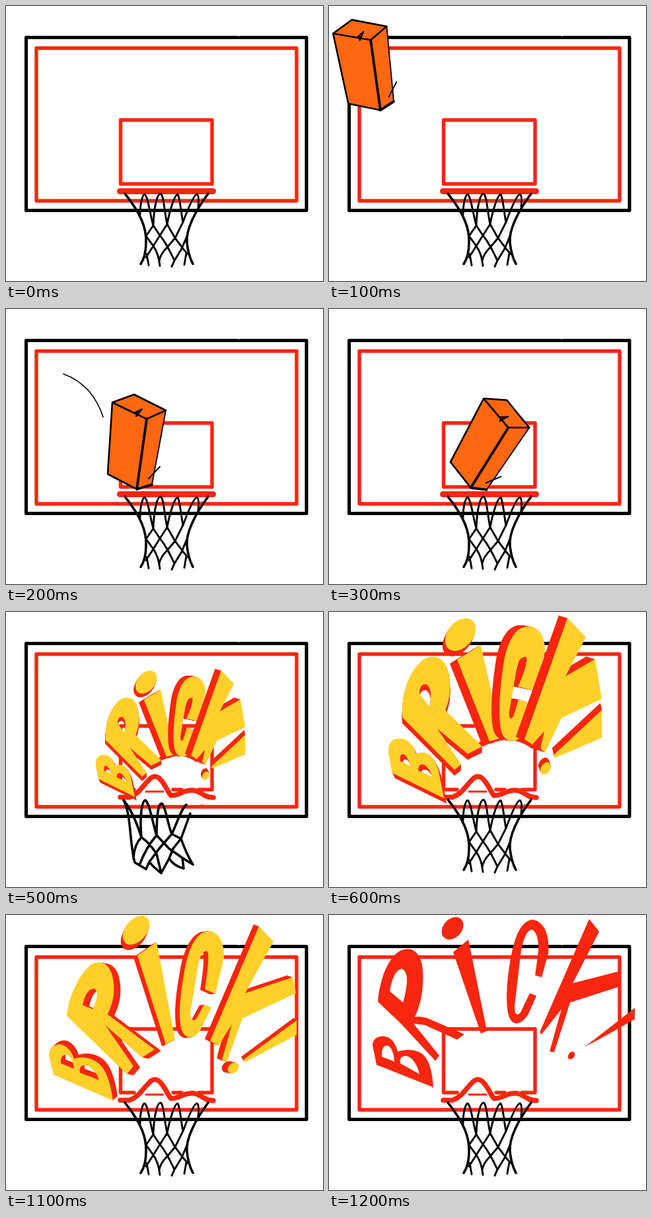
Recreate the animation shown at these times as an HTML page. Size 480 by 415 pixels, loop 1.3 s.

```html
<!DOCTYPE html>
<html lang="en">
<head>
<meta charset="utf-8">
<title>Brick</title>
<style>
html, body { margin: 0; width: 100%; height: 100%; overflow: hidden; background: #fff; }
svg { display: block; width: 100vw; height: 100vh; }
</style>
</head>
<body>
<svg id="stage" viewBox="0 0 480 415">
  <defs>
    <filter id="rough" x="0" y="0" width="480" height="415" filterUnits="userSpaceOnUse" color-interpolation-filters="sRGB">
      <feTurbulence type="fractalNoise" baseFrequency=".16" numOctaves="1" seed="4"/>
      <feDisplacementMap in="SourceGraphic" scale="1.6" xChannelSelector="R" yChannelSelector="G"/>
    </filter>
  </defs>
</svg>
<script>
const RED = '#f9260f', ORANGE = '#ff6710', YELLOW = '#ffd02a', BLACK = '#000';
const stage = document.getElementById('stage');

const fill = (d, color) => `<path d="${d}" fill="${color}" fill-rule="evenodd"/>`;
const line = (d, color, width) =>
  `<path d="${d}" fill="none" stroke="${color}" stroke-width="${width}" stroke-linecap="round" stroke-linejoin="round"/>`;
const group = (body, attrs = '') => `<g ${attrs}>${body}</g>`;
const rough = body => group(body, 'filter="url(#rough)"');

// Solid letter: face on top of copies swept along (dx, dy).
function solid([d, dx, dy]) {
  const steps = Math.ceil(Math.hypot(dx, dy));
  let out = '';
  for (let i = steps; i > 0; i--)
    out += group(fill(d, RED), `transform="translate(${dx * i / steps} ${dy * i / steps})"`);
  return out + fill(d, YELLOW);
}

const blob = (cx, cy, rx, ry, angle) => {
  const a = angle * Math.PI / 180, x = rx * Math.cos(a), y = rx * Math.sin(a);
  return `M${cx - x} ${cy - y}a${rx} ${ry} ${angle} 1 1 ${2 * x} ${2 * y}a${rx} ${ry} ${angle} 1 1 ${-2 * x} ${-2 * y}Z`;
};

const board = rough(
  line('M30.500 47.500H455V308.500H30.500Z', BLACK, 5) +
  line('M46 63.500H440V294H46Z', RED, 5.400));

const square = rough(line('M173.500 172H312V268.500H173.500Z', RED, 5.400));
const rim = rough(line('M172.500 279.500H313.500', RED, 9));

const brokenSquare = rough(
  line('M194 268H173.500V172H312V268H292M253 268H266', RED, 5.400) + line('M212 271H238', RED, 3));
const brokenRim = rough(line(
  'M173 279.500H187C202 274 208 261 215 255Q225 242 235 254C242 262 245 272 250 277C264 277 268 268 283 269C296 270 298 280 314 280',
  RED, 7.500));

const net = group(
  line('M180 282C205 313 213 335 212 356Q212 376 204 388M306 282C286 309 272 337 274 356Q276 375 283 388', BLACK, 3.600) +
  line('M203 314C203 296 207 283 210 283C215 286 218 313 223 330C224 301 229 282 234 282C239 284 240 311 244 328' +
    'C248 307 255 284 260 283C264 290 265 312 268 325C274 309 284 284 289 283Q293 285 291 302', BLACK, 2.900) +
  line('M223 330L212 346L223 361Q231 372 233 391M223 330L233 345C242 356 247 366 255 383L251 392' +
    'M244 328L233 345L223 361L212 378M244 328L256 349L268 365L275 373' +
    'M268 325L256 349L244 363Q233 374 232 384M274 346L266 365L255 383M213 373L216 390M273 372L270 389', BLACK, 2.900),
  'transform="translate(0 1.2)"');

const stretchedNet = line(
  'M178 284C190 306 187 351 195 378L212 388L217 377Q224 386 235 394L247 372Q254 383 269 387L267 371L283 381' +
  'Q273 365 265 342L279 304M178 284Q193 302 205 340C202 307 206 285 211 284C217 287 222 318 228 337' +
  'C228 305 231 288 236 289C242 294 245 321 251 335C259 319 265 297 273 291' +
  'M205 340Q194 351 193 372M205 340Q216 347 228 365L235 394M228 337Q212 355 202 382M228 337L247 357L267 371' +
  'M251 335L232 357L217 377M265 342L253 357L247 372M251 335L265 342', BLACK, 3.600);

const brick =
  fill('M161 141L194 129L242 153L221 265L198 272L154 249Z', ORANGE) +
  line('M198 272L154 249L161 141L213 166L242 153L194 129L161 141', BLACK, 2.600) +
  line('M213 166L198 272L221 265', BLACK, 3.800) +
  line('M242 153L221 265', BLACK, 1.800) +
  line('M216 256L233 238M194 157L206 151L197 162L199 155', BLACK, 2);

const swoosh = line('M87 98Q131 114 147 163', BLACK, 1.600);

const splat =
  rough(line('M173 279H186L196 271M309 280H314', RED, 8)) +
  fill('M190 268Q211 239 228 244L235 258Z', RED) +
  fill('M303 195L329 189L339 213L307 290L305 308L298 299L276 298L272 285L259 283L249 288L222 285L202 288' +
    'Q214 280 214 272L200 271Q214 267 178 262Q209 260 226 253Q240 244 233 222Q240 239 257 246Z', ORANGE) +
  line('M250 255L303 195L329 190L339 213L308 291', BLACK, 2) +
  line('M328 191L288 260L308 291M288 260L272 256', BLACK, 3.400) +
  line('M193 274L229 264', BLACK, 2) +
  line('M254 199L261 223', BLACK, 1.500);

const bigLetters =
  line('M212 214Q228 197 246 194Q279 181 308 202', RED, 8) +
  [
    ['M96 243L90 213C89 196 98 190 108 191C121 192 128 202 132 214C150 207 160 219 166 240L174 281Z' +
      'M108 225Q106 212 114 215Q120 220 123 232ZM135 239Q135 227 145 231Q153 237 157 249Z', 4, 8],
    ['M111 159C110 125 118 95 140 74C158 61 176 68 181 92C185 112 184 130 176 148L232 203L210 214L164 176L200 230L190 238Z' +
      'M137 123Q137 108 147 109Q158 116 152 143Z', 0, 9],
    ['M194 72L230 50L261 190L243 195Z', -11, 6],
    [blob(199, 34, 28, 19, -50), -4, 8],
    ['M310 118L327 60C328 32 314 21 300 22C280 23 268 50 264 80C258 120 256 160 261 180C266 200 288 198 294 183' +
      'L308 139L287 132L279 158Q272 166 273 150L285 80Q290 66 299 68Q301 80 286 113Z', -12, -2],
    ['M361 9L389 38L358 97L403 71L413 131L352 160L327 212L320 206L326 180L308 200L296 192Z', -13, -4],
    ['M413 148L413 190L342 220L340 216Z', -2, -11],
    [blob(328, 236, 10, 7, -58), -3, -7]
  ].map(solid).join('');

const loosenedLetters =
  [
    ['M72 241L65 213C64 200 75 193 86 196Q98 201 103 217C119 212 136 217 146 230Q157 245 162 280Z' +
      'M83 224Q82 210 92 211Q101 215 103 232ZM112 238Q110 225 122 227Q136 233 141 249Z', 7, -6],
    ['M92 152C94 130 107 91 130 74C148 66 161 78 163 103C165 126 159 138 154 150L225 203L206 215L150 166L193 228L183 240Z' +
      'M116 136Q121 111 134 111Q143 117 131 142Z', 10, 2],
    ['M199 61L228 41L256 188L242 195Z', -6, 3],
    [blob(197, 23, 25, 16, -50), -3, 8],
    ['M317 119L330 64C331 36 318 24 306 24C288 26 277 50 271 80C264 119 261 145 265 170C270 189 285 188 294 174L311 140L300 135' +
      'L288 157Q280 163 279 148L291 75Q297 51 305 55Q309 62 301 112Z', -7, 1],
    ['M383 17L405 40L362 118L434 94L439 118L358 156L334 222L327 219L342 165L322 197L309 190Z', -8, -3],
    ['M440 159L440 181L362 222L360 218Z', -4, -4],
    [blob(344, 231, 9.500, 7, -45), -9, -2]
  ].map(solid).join('');

const flatLetters =
  [
    'M72 226L66 197C66 185 77 181 88 184Q99 188 104 206C120 201 139 203 147 216Q156 230 158 260Z' +
      'M80 214Q79 196 89 197Q98 202 99 221ZM108 224Q106 211 119 213Q132 219 137 240Z',
    'M74 131C76 103 87 67 106 55C126 44 140 58 142 83C144 113 138 137 130 154Q138 152 150 156L205 180L194 188' +
      'L145 166L128 164L167 212L161 220L108 163ZM92 115Q97 84 110 81Q125 87 112 132Z',
    'M188 56L211 37L239 175L230 179Z',
    blob(187, 20, 19, 14, -48),
    'M322 94L332 58C335 25 322 8 308 7C291 9 282 31 276 61C269 96 267 132 272 152C278 170 293 165 302 149L314 122L304 118' +
      'L290 147Q281 157 281 137L291 52Q298 21 308 22Q318 29 317 55L312 91Z',
    'M394 6L409 25L369 103L439 85L440 108L365 132L341 207L334 206L352 142L322 180L319 177Z',
    'M463 140L463 157Q424 180 387 199Q424 171 463 140Z',
    blob(367, 212, 6.500, 4.500, -52)
  ].map(d => fill(d, RED)).join('');

// White gap the burst leaves in the square, below a given top edge.
const cleared = top => brokenSquare + fill(`M185 225${top}V264H260L226 242L180 264Z`, '#fff') + brokenRim;
const hoop = square + rim + net;
const openSquare = cleared('Q190 194 245 192Q300 185 306 195');

const scenes = [
  [0, hoop],
  [100, hoop + group(brick, 'transform="translate(-140 -112) rotate(-16 198 200)"')],
  [200, hoop + swoosh + brick],
  [300, hoop + group(brick, 'transform="translate(46 4) rotate(24 198 200)"')],
  [400, rough(line('M192 268H173.500V172H312V200', RED, 5.400)) + stretchedNet + splat],
  [500, openSquare + stretchedNet + group(bigLetters, 'transform="translate(73 82) scale(.7)"')],
  [600, openSquare + net + bigLetters],
  [1100, cleared('Q215 203 247 196Q285 165 306 190') + net + loosenedLetters],
  [1200, brokenSquare + brokenRim + net + flatLetters]
];
const LOOP = 1300;

stage.insertAdjacentHTML('beforeend', board + scenes.map(([, body]) => group(body, 'class="scene" display="none"')).join(''));
const layers = [...stage.querySelectorAll('.scene')];

function render(time) {
  const current = scenes.findLastIndex(([start]) => time >= start);
  layers.forEach((layer, i) => layer.setAttribute('display', i === current ? 'inline' : 'none'));
}

const began = performance.now();
function tick() {
  render((performance.now() - began) % LOOP);
  requestAnimationFrame(tick);
}
tick();
</script>
</body>
</html>
```
